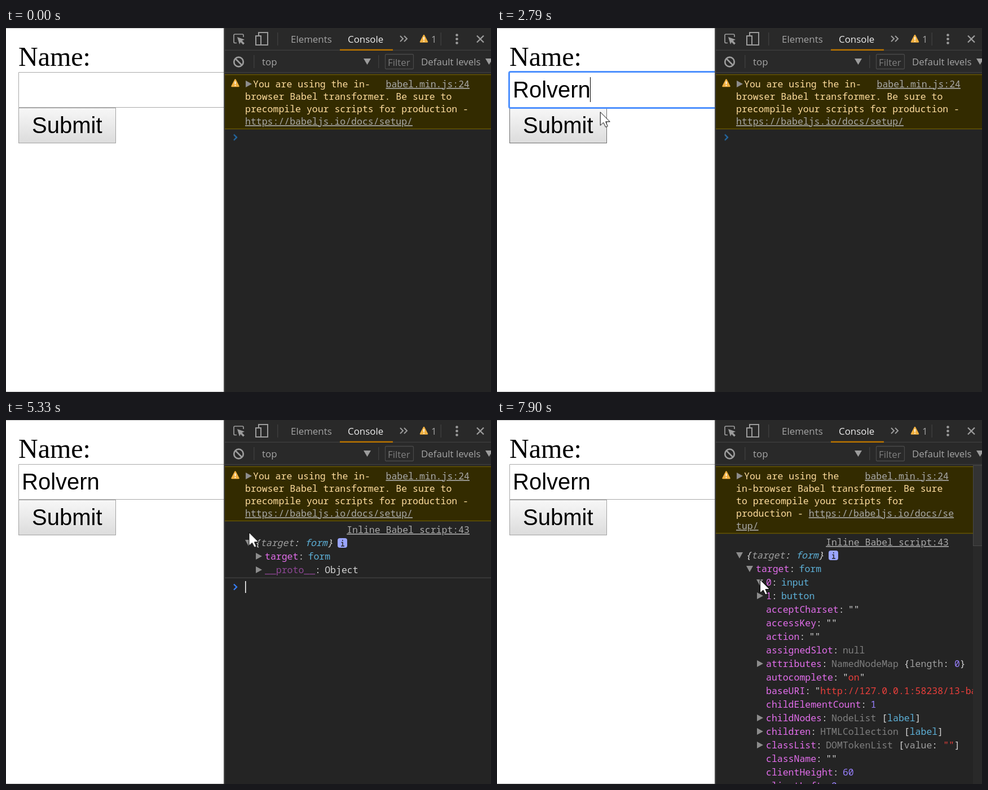
Write an HTML page that moves like this. It is 860 px wide and 644 px high and loops after 8000 ms.

```html
<!DOCTYPE html>
<html lang="en">
<head>
<meta charset="utf-8">
<title>Form event in the console</title>
<style>
html, body { margin: 0; width: 100%; height: 100%; overflow: hidden; background: #fff; }
svg, .typed { position: absolute; left: 0; top: 0; }
text { white-space: pre; }

.ui { font: 16.9px "Open Sans", sans-serif; fill: #a5a5a5; }
.ui .on { fill: #eee; }
.ui .dim { fill: #7f7f7f; }
.mono { font: 16.5px "Noto Sans Mono", monospace; fill: #d5d5d5; }
.warn { fill: #ffdd9e; }
.link { fill: #a9a9a9; text-decoration: underline; }
.right { text-anchor: end; }
.em { font-style: italic; }
.key { fill: #e36eec; }
.proto { fill: #8f4796; }
.node { fill: #5db0d7; }
.num { fill: #9980ff; }
.str { fill: #e93f3b; }
.null { fill: #7f7f7f; }
.gray { fill: #9e9e9e; }
.tri { fill: #8c8c8c; }
.rule { fill: #3d3d3d; }

/* 1% of the loop is 80 ms */
.step, .typed span { animation: 8s step-end infinite; }
.focus { animation-name: focus; }
.caret::after { animation: caret 8s step-end infinite; }
.hover { animation-name: hover; }
.idle { animation-name: idle; }
.closed { animation-name: closed; }
.opened { animation-name: opened; }
.tree { animation-name: tree; }
.short { animation-name: short; }
.target-shut { animation-name: target-shut; }
.target-open { animation-name: target-open; }
.prompt-caret { animation-name: prompt-caret; }
.item-shut { animation-name: item-shut; }
.item-open { animation-name: item-open; }
.arrow { animation-name: arrow; }
.beam { animation-name: beam; }

@keyframes focus { 0% { opacity: 0 } 12.25% { opacity: 1 } 38.625%, 100% { opacity: 0 } }
@keyframes caret { 0% { opacity: 0 } 12.25% { opacity: 1 } 35.25%, 100% { opacity: 0 } }
@keyframes hover { 0% { opacity: 0 } 34.375% { opacity: 1 } 44.125%, 100% { opacity: 0 } }
@keyframes idle { 0% { opacity: 1 } 40.125%, 100% { opacity: 0 } }
@keyframes closed { 0% { opacity: 0 } 40.125% { opacity: 1 } 60.875%, 100% { opacity: 0 } }
@keyframes opened { 0% { opacity: 0 } 60.875% { opacity: 1 } 80.375%, 100% { opacity: 0 } }
@keyframes short { 0% { opacity: 1 } 80.375%, 100% { opacity: 0 } }
@keyframes tree { 0% { opacity: 0 } 80.375%, 100% { opacity: 1 } }
@keyframes target-shut { 0% { opacity: 1 } 77.875%, 100% { opacity: 0 } }
@keyframes target-open { 0% { opacity: 0 } 77.875%, 100% { opacity: 1 } }
@keyframes prompt-caret {
  0%, 67.125%, 76.25% { opacity: 0 }
  60.875%, 73.375%, 77.875%, 100% { opacity: 1 }
}
@keyframes item-shut { 0% { opacity: 1 } 98.75%, 100% { opacity: 0 } }
@keyframes item-open { 0% { opacity: 0 } 98.75%, 100% { opacity: 1 } }
@keyframes arrow { 0%, 10.25% { opacity: 0 } 1.5%, 34.25%, 100% { opacity: 1 } }
@keyframes beam { 0%, 34.25%, 100% { opacity: 0 } 10.25% { opacity: 1 } }

/* typing: each letter takes its space when its key goes down */
.typed {
  left: 28px; top: 87px; height: 44px; min-width: 1px;
  font: 40px/45px "Liberation Sans", Arial, sans-serif; white-space: nowrap;
}
.typed::after {
  content: ""; position: absolute; right: 0; top: 0;
  width: 1px; height: 44px; background: #000;
}
@keyframes key1 { 0% { font-size: 0 } 19.625% { font-size: 40px } }
@keyframes key2 { 0% { font-size: 0 } 22.875% { font-size: 40px } }
@keyframes key3 { 0% { font-size: 0 } 24.125% { font-size: 40px } }
@keyframes key4 { 0% { font-size: 0 } 25.375% { font-size: 40px } }
@keyframes key5 { 0% { font-size: 0 } 26.5% { font-size: 40px } }
@keyframes key6 { 0% { font-size: 0 } 27.75% { font-size: 40px } }
@keyframes key7 { 0% { font-size: 0 } 29% { font-size: 40px } }
.typed span:nth-child(1) { animation-name: key1; }
.typed span:nth-child(2) { animation-name: key2; }
.typed span:nth-child(3) { animation-name: key3; }
.typed span:nth-child(4) { animation-name: key4; }
.typed span:nth-child(5) { animation-name: key5; }
.typed span:nth-child(6) { animation-name: key6; }
.typed span:nth-child(7) { animation-name: key7; }

.pointer { animation: move 8s linear infinite; }
@keyframes move {
  0% { transform: translate(679px, 640px) }
  1.5% { transform: translate(679px, 634px); animation-timing-function: cubic-bezier(.35, .2, .45, 1) }
  11.5%, 33.125% { transform: translate(211px, 126px) }
  34.875% { transform: translate(183px, 148px); animation-timing-function: ease-out }
  37%, 43.125% { transform: translate(150px, 176px); animation-timing-function: ease-in }
  46.375% { transform: translate(346px, 212px); animation-timing-function: ease-out }
  49% { transform: translate(418px, 214px); animation-timing-function: ease-out }
  52.875%, 53.375% { transform: translate(434px, 205px) }
  54.875%, 66% { transform: translate(430px, 197px); animation-timing-function: ease-in-out }
  70.625%, 72.625% { transform: translate(441px, 233px) }
  74.375%, 85.25% { transform: translate(443px, 238px); animation-timing-function: ease-in-out }
  91.25% { transform: translate(465px, 282px); animation-timing-function: step-end }
  96.5%, 100% { transform: translate(466px, 282px) }
}
</style>
</head>
<body>
<svg width="860" height="644" viewBox="0 0 860 644">
  <defs>
    <linearGradient id="face" x2="0" y2="1">
      <stop stop-color="#f7f7f7"/><stop offset="1" stop-color="#dcdcdc"/>
    </linearGradient>
    <path id="shut" class="tri" d="M-5-6 6 0-5 6Z"/>
    <path id="open" class="tri" d="M-6-5H6L0 6Z"/>
    <path id="chevron" d="M-3-5 2 0-3 5" fill="none" stroke-width="2.4"/>
    <g id="alert">
      <path d="M0-6 6 5.5H-6Z" fill="#f0b040" stroke="#f0b040" stroke-width="2.5" stroke-linejoin="round"/>
      <path d="M0-3V2M0 3.5V5.3" stroke="#fff" stroke-width="1.8"/>
    </g>
    <g id="info">
      <rect x="588" y="-14" width="17" height="17" rx="4" fill="#9aa5ff"/>
      <path d="M594.5-6.5H597V0M594 0H600M596.8-11V-9" fill="none" stroke="#242424" stroke-width="1.5"/>
    </g>
    <clipPath id="pane"><rect x="388" y="80" width="456" height="564"/></clipPath>
  </defs>

  <!-- page -->
  <path d="M0 .5H386M0 643.5H386" stroke="#c4c4c4"/>
  <text x="22" y="67" font-size="48" font-family="Liberation Serif, Times New Roman, serif">Name:</text>
  <path d="M387 78.500H22.500V140.500H387" fill="none" stroke="#a9a9a9"/>
  <rect x="22.500" y="141.500" width="172" height="62" fill="url(#face)" stroke="#a3a3a3"/>
  <rect class="step hover" x="22.500" y="141.500" width="172" height="62" fill="none" stroke="#707070"/>
  <text x="46" y="186" font-size="40" font-family="Liberation Sans, Arial, sans-serif">Submit</text>
  <path class="step focus" d="M390 77.500H24Q21.500 77.500 21.500 80V139Q21.500 141.500 24 141.500H390" fill="none" stroke="#4d90fe" stroke-width="3"/>

  <!-- developer tools -->
  <rect x="386" width="474" height="644" fill="#242424"/>
  <rect x="388" width="472" height="79" fill="#292929"/>
  <path class="rule" d="M388 38.500h472v1.500H388zM388 78h472v1.500H388zM481 8h1.500v23H481zM770.500 8h1.500v23h-1.500zM439 48h1.500v23H439zM660 48h1.500v23H660z"/>
  <rect x="386" width="2" height="644" fill="#4a4a4a"/>
  <rect x="592" y="37.500" width="94" height="2.500" fill="#b87300"/>

  <g fill="none" stroke="#9c9c9c" stroke-width="2">
    <path d="M409 26.500H406Q404 26.500 404 24.500V13Q404 11 406 11H419Q421 11 421 13V16" stroke-width="1.700"/>
    <path d="M410 16 423 20.500 418.500 22.500 423 27 420.500 29.500 416 25 414 29Z" fill="#9c9c9c" stroke="none"/>
    <path d="M448 13V8H464V30H453M443 14H452V30H443Z"/>
    <path d="M699 14 704 19 699 24M706 14 711 19 706 24"/>
    <path d="M835 13.500 847 25.500M847 13.500 835 25.500" stroke-width="2.300"/>
    <circle cx="412.500" cy="60" r="8.300" stroke-width="2.700"/>
    <path d="M407 54.500 418 65.500" stroke-width="2.700"/>
    <rect x="672.500" y="46.500" width="50" height="26" rx="2" stroke="#484848" stroke-width="1.300"/>
  </g>
  <g fill="#9c9c9c">
    <circle cx="799.500" cy="12.500" r="2.300"/><circle cx="799.500" cy="19.500" r="2.300"/><circle cx="799.500" cy="26.500" r="2.300"/>
    <path d="M634 54H647L640.500 65ZM850 54H863L856.500 65Z"/>
  </g>
  <use href="#alert" x="741" y="19"/>
  <g class="ui">
    <text x="505" y="26">Elements</text>
    <text class="on" x="606" y="26">Console</text>
    <text x="754" y="26">1</text>
    <text x="454" y="66">top</text>
    <text class="dim" x="677" y="67">Filter</text>
    <text x="736" y="66">Default levels</text>
  </g>

  <g class="mono">
    <!-- warning at full width -->
    <g class="step short">
      <path d="M388 82.500H860V178.500H388Z" fill="#332b00"/>
      <path d="M388 82.500H860M388 178.500H860" stroke="#665500" stroke-width="1.500"/>
      <g class="warn">
        <text x="438" y="105">You are using the in-</text>
        <text x="424" y="127">browser Babel transformer. Be sure to</text>
        <text x="424" y="149">precompile your scripts for production -</text>
      </g>
      <text class="link" x="424" y="171">https://babeljs.io/docs/setup/</text>
      <text class="link right" x="822" y="105">babel.min.js:24</text>
    </g>

    <use class="step idle" href="#chevron" x="407" y="193.500" stroke="#2469a5"/>

    <!-- logged object, collapsed -->
    <g class="step closed">
      <use href="#shut" x="430" y="195"/>
      <text class="em" x="441" y="201">{<tspan class="gray">target</tspan>: <tspan class="node">form</tspan>}</text>
      <text class="link right" x="822" y="200">Inline Babel script:43</text>
      <rect class="rule" x="388" y="209" width="472" height="1.500"/>
      <use href="#chevron" x="407" y="226.500" stroke="#367cf1"/>
    </g>

    <!-- logged object, one level open -->
    <g class="step opened">
      <text class="link right" x="822" y="200">Inline Babel script:43</text>
      <use href="#open" x="430" y="217"/>
      <text class="em" x="441" y="223">{<tspan class="gray">target</tspan>: <tspan class="node">form</tspan>}</text>
      <use href="#info" y="223"/>
      <use class="step target-shut" href="#shut" x="448" y="241"/>
      <use class="step target-open" href="#open" x="448" y="241"/>
      <text x="459" y="247"><tspan class="key">target</tspan>:<tspan class="node" dx="7.200">form</tspan></text>
      <use href="#shut" x="448" y="265"/>
      <text x="459" y="271"><tspan class="proto">__proto__</tspan>:<tspan dx="7.200">Object</tspan></text>
      <rect class="rule" x="388" y="278.500" width="472" height="1.500"/>
      <use href="#chevron" x="407" y="295.500" stroke="#367cf1"/>
      <rect class="step prompt-caret" x="424" y="285" width="1.500" height="21" fill="#fff"/>
    </g>

    <!-- form properties, narrowed by the scrollbar -->
    <g class="step tree">
      <g clip-path="url(#pane)">
        <path d="M388 82.500H844V200.500H388Z" fill="#332b00"/>
        <path d="M388 82.500H844M388 200.500H844" stroke="#665500" stroke-width="1.500"/>
        <g class="warn">
          <text x="438" y="105">You are using the</text>
          <text x="424" y="127">in-browser Babel transformer. Be sure</text>
          <text x="424" y="149">to precompile your scripts for</text>
          <text x="424" y="171">production - <tspan class="link">https://babeljs.io/docs/se</tspan></text>
        </g>
        <text class="link" x="424" y="193">tup/</text>
        <text class="link right" x="801" y="105">babel.min.js:24</text>
        <text class="link right" x="801" y="222">Inline Babel script:43</text>
        <use href="#open" x="430" y="239"/>
        <text class="em" x="441" y="245">{<tspan class="gray">target</tspan>: <tspan class="node">form</tspan>}</text>
        <use href="#info" y="245"/>
        <use href="#open" x="448" y="263"/>
        <text x="459" y="269"><tspan class="key">target</tspan>:<tspan class="node" dx="7.200">form</tspan></text>
        <use class="step item-shut" href="#shut" x="466" y="287"/>
        <use class="step item-open" href="#open" x="466" y="287"/>
        <use href="#shut" x="466" y="311"/>
        <use href="#shut" x="466" y="431"/>
        <use href="#shut" x="466" y="527"/>
        <use href="#shut" x="466" y="551"/>
        <use href="#shut" x="466" y="575"/>
        <text x="477" y="293"><tspan class="key">0</tspan>:<tspan class="node" dx="7.200">input</tspan></text>
        <text x="477" y="317"><tspan class="key">1</tspan>:<tspan class="node" dx="7.200">button</tspan></text>
        <text x="477" y="341"><tspan class="key">acceptCharset</tspan>:<tspan dx="7.200">""</tspan></text>
        <text x="477" y="365"><tspan class="key">accessKey</tspan>:<tspan dx="7.200">""</tspan></text>
        <text x="477" y="389"><tspan class="key">action</tspan>:<tspan dx="7.200">""</tspan></text>
        <text x="477" y="413"><tspan class="key">assignedSlot</tspan>:<tspan class="null" dx="7.200">null</tspan></text>
        <text x="477" y="437"><tspan class="key">attributes</tspan>:<tspan class="null" dx="7.200">NamedNodeMap</tspan> {<tspan class="gray">length</tspan>: <tspan class="num">0</tspan>}</text>
        <text x="477" y="461"><tspan class="key">autocomplete</tspan>:<tspan dx="7.200">"</tspan><tspan class="str">on</tspan>"</text>
        <text x="477" y="485"><tspan class="key">baseURI</tspan>:<tspan dx="7.200">"</tspan><tspan class="str">http://127.0.0.1:58238/13-base</tspan></text>
        <text x="477" y="509"><tspan class="key">childElementCount</tspan>:<tspan class="num" dx="7.200">1</tspan></text>
        <text x="477" y="533"><tspan class="key">childNodes</tspan>:<tspan class="null" dx="7.200">NodeList</tspan> [<tspan class="node">label</tspan>]</text>
        <text x="477" y="557"><tspan class="key">children</tspan>:<tspan class="null" dx="7.200">HTMLCollection</tspan> [<tspan class="node">label</tspan>]</text>
        <text x="477" y="581"><tspan class="key">classList</tspan>:<tspan class="null" dx="7.200">DOMTokenList</tspan> [<tspan class="gray">value</tspan>: <tspan class="str">""</tspan>]</text>
        <text x="477" y="605"><tspan class="key">className</tspan>:<tspan dx="7.200">""</tspan></text>
        <text x="477" y="629"><tspan class="key">clientHeight</tspan>:<tspan class="num" dx="7.200">60</tspan></text>
        <text x="477" y="653"><tspan class="key">clientLeft</tspan>:<tspan class="num" dx="7.200">0</tspan></text>
      </g>
      <rect x="844" y="80" width="16" height="564" fill="#292929"/>
      <rect x="844.500" y="80.500" width="16" height="142" fill="#333" stroke="#484848"/>
    </g>
    <use href="#alert" x="406.500" y="97.500"/>
    <use href="#shut" x="430" y="99"/>
  </g>
</svg>

<div class="typed caret"><span>R</span><span>o</span><span>l</span><span>v</span><span>e</span><span>r</span><span>n</span></div>

<svg width="860" height="644" viewBox="0 0 860 644">
  <g class="pointer">
    <path class="step arrow" d="M.5.5V24L6 19 10 27 13.500 25.500 10 17.500H17.500Z" fill="#fff" stroke="#000"/>
    <path class="step beam" d="M-6.500-11H-2Q0-11 0-9Q0-11 2-11H6.500M0-10V10M-6.500 11H-2Q0 11 0 9Q0 11 2 11H6.500" fill="none" stroke="#000" stroke-width="2"/>
  </g>
</svg>
</body>
</html>
```
